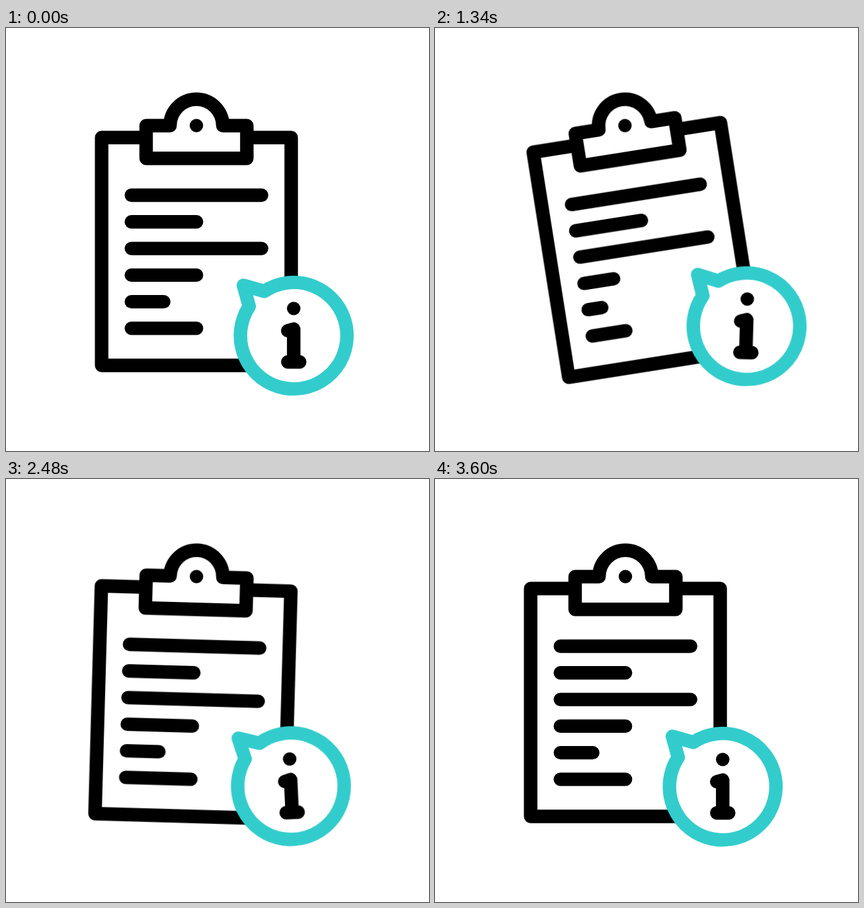
Write an HTML page without scripts that moves like this. It is 640 px wide and 640 px high and loops after 3620 ms.

```html
<!DOCTYPE html>
<html lang="en">
<head>
<meta charset="utf-8">
<title>Clipboard info</title>
<style>
  @property --near { syntax: "<length>"; inherits: true; initial-value: 0px; }
  @property --far { syntax: "<length>"; inherits: true; initial-value: 0px; }

  html, body { margin: 0; height: 100%; overflow: hidden; background: #fff; }
  svg { display: block; width: 100%; height: 100%; }

  svg, svg * {
    animation-duration: 3.62s;
    animation-iteration-count: infinite;
    animation-timing-function: cubic-bezier(.333, 0, .667, 1);
  }

  .ink { stroke: #000; }
  .teal { stroke: #3cc; }
  .dot { fill: #000; stroke: none; }

  .board { transform-origin: 288px 152px; animation-name: swing; }
  .bubble { transform-origin: 371.3px 401.5px; animation-name: sway; }

  .rows path {
    stroke-dasharray: var(--len) 999px;
    animation-name: rewrite;
    animation-delay: calc(var(--i) * .2s);
    animation-fill-mode: backwards;
  }
  .long { --len: 197px; }
  .mid { --len: 98.5px; }
  .short { --len: 49px; }

  .rays { animation-name: near, far, flash; }
  .rays path {
    stroke-dasharray: calc(var(--far) - var(--near)) 999px;
    stroke-dashoffset: calc(-1 * var(--near));
  }

  @keyframes swing {
    0%, 99.448%, 100% { transform: rotate(0deg); }
    19.89%, 59.669% { transform: rotate(10deg); }
    39.779%, 79.558% { transform: rotate(-10deg); }
  }
  /* counter-swing, relative to the board */
  @keyframes sway {
    0%, 99.448%, 100% { transform: rotate(0deg); }
    19.89%, 59.669% { transform: rotate(-16deg); }
    39.779%, 79.558% { transform: rotate(12deg); }
  }
  @keyframes rewrite {
    0%, 33.149%, 100% { stroke-dasharray: var(--len) 999px; }
    16.575% { stroke-dasharray: 20px 999px; }
    27.624% { stroke-dasharray: calc(var(--len) + 10px) 999px; }
  }
  @keyframes near {
    0%, 74.586% { --near: 0px; }
    89.503%, 100% { --near: 59.5px; }
  }
  @keyframes far {
    0%, 74.033% { --far: 0.1px; }
    82.873%, 100% { --far: 59.6px; }
  }
  @keyframes flash {
    0%, 89.4%, 100% { opacity: 0; animation-timing-function: step-end; }
    74.1% { opacity: 1; animation-timing-function: step-end; }
  }
</style>
</head>
<body>
<svg viewBox="0 0 640 640" fill="none" stroke-width="20.4" stroke-linecap="round" stroke-linejoin="round">
  <g class="board ink">
    <path d="M144.7 165.7H431.5V510.5H144.7Z" fill="#fff"/>
    <path d="M212 147.7H248.2a39.9 39.9 0 0 1 79.8 0H364.4V197.2H212Z" fill="#fff"/>
    <circle class="dot" cx="288.1" cy="147.6" r="10.2"/>
    <g class="rows">
      <path class="long" style="--i:0" d="M189.7 253h220"/>
      <path class="mid" style="--i:1" d="M189.7 293.2h220"/>
      <path class="long" style="--i:2" d="M189.7 333.6h220"/>
      <path class="mid" style="--i:3" d="M189.7 373.9h220"/>
      <path class="short" style="--i:4" d="M189.7 414.1h220"/>
      <path class="mid" style="--i:5" d="M189.7 454.4h220"/>
    </g>
    <g class="bubble">
      <path class="teal" d="M368 421.2L359.2 389.4L390.7 398.4A80.6 80.6 0 1 1 368 421.2Z" fill="#fff"/>
      <circle class="dot" cx="435.3" cy="424.4" r="10.2"/>
      <path d="M426.3 458L435.3 455.6V505.2M426.3 505.2H444.4"/>
    </g>
  </g>
  <g class="rays teal" transform="translate(388 142.4)">
    <path d="M38.5 0h62"/>
    <path d="M38.5 0h62" transform="rotate(-45)"/>
    <path d="M38.5 0h62" transform="rotate(-90)"/>
  </g>
</svg>
</body>
</html>
```
